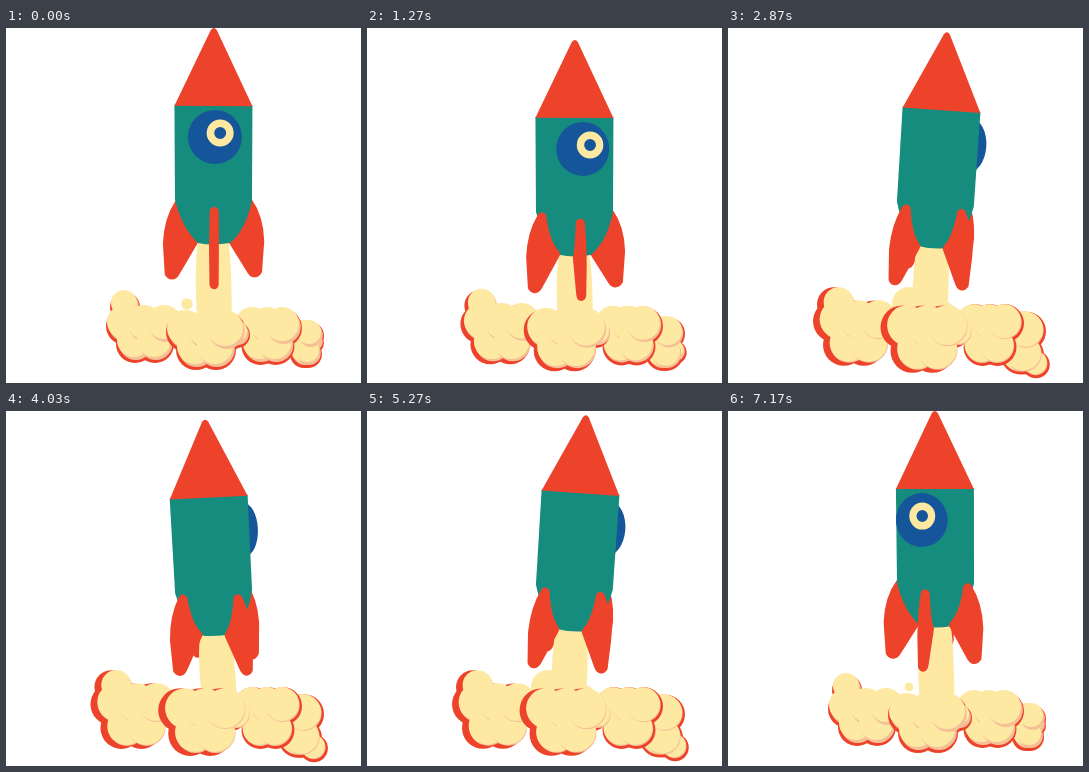
Animation of 355 by 355 pixels, one loop 7.2 s. Source, as an HTML page with a canvas:

```html
<!DOCTYPE html>
<html lang="en">
<head>
<meta charset="utf-8">
<title>Rocket</title>
<style>
html, body { margin: 0; width: 100%; height: 100%; overflow: hidden; background: #fff; }
canvas { display: block; }
</style>
</head>
<body>
<canvas width="355" height="355"></canvas>
<script>
const c = document.querySelector('canvas').getContext('2d');
const RED = '#ee432b', CREAM = '#fee9a3', PINK = '#f6c096', TEAL = '#168c7e', BLUE = '#15569a';
const CYCLE = 72;

// A cloud is a zigzag of puffs plus one nub; it drifts by move and leans its rim as it swells.
const CLOUDS = [
  { x: 138, y: 303, w: 40, r: 17, grow: 2, move: -8, lean: -5, nub: [118, 275, 13], drop: -1 },
  { x: 299, y: 313, w: 8, r: 12, grow: 6, move: -6, lean: 1, nub: [307, 311, 8], drop: 25 },
  { x: 261, y: 305, w: 30, r: 17, grow: 0, move: 0, lean: 1, nub: [270, 294, 13], drop: 0 },
  { x: 199, y: 309, w: 40, r: 18, grow: 2, move: 0, lean: -5, nub: [230, 303, 11], drop: 0 }
];

const mix = (a, b, k) => a + (b - a) * k;
const sin = deg => Math.sin(deg * Math.PI / 180);
const cos = deg => Math.cos(deg * Math.PI / 180);

function oval(x, y, rx, ry, color) {
  c.beginPath();
  c.ellipse(x, y, rx, ry, 0, 0, 7);
  c.fillStyle = color;
  c.fill();
}

const disc = (x, y, r, color) => oval(x, y, r, r, color);

function shape(d, color) {
  c.fillStyle = color;
  c.fill(new Path2D(d));
}

function fin(angle) {
  const s = sin(angle), k = .3 * cos(angle);
  const at = (r, y) => `${r * s} ${y + r * k}`;
  const d = `M${at(35, 173)}Q${at(46, 188)} ${at(47, 212)}L${at(45, 242)}` +
    `Q${at(42, 246)} ${at(39, 242)}L${at(20, 212)}Q${at(31, 200)} ${at(35, 173)}Z`;
  shape(d, RED);
  c.strokeStyle = RED;
  c.lineWidth = 9;
  c.lineJoin = 'round';
  c.stroke(new Path2D(d));
}

function porthole(angle) {
  const s = sin(angle), k = cos(angle), w = Math.abs(k);
  const x = (42 + 5 * k) * s, y = 109 + 1.5 * (1 - k);
  oval(x, y, Math.max(27 * w, 6), 27, BLUE);
  if (k < .1) return;
  const eye = x + (4.7 + 15 * s) * k;
  oval(eye, y - 4, 13.5 * w, 13.5, CREAM);
  oval(eye, y - 4, 6 * w, 6, BLUE);
}

function exhaust(step, top, lean) {
  const x = 207 - 48 * lean, y = top + 210, end = 209 - 130 * lean;
  shape(`M${x - 14} ${y}Q${x - 20} ${y + 28} ${end - 16} 310H${end + 17}Q${x + 20} ${y + 28} ${x + 15} ${y}Z`, CREAM);
  const puff = Math.max(0, 17 * cos((step - 14) * 5));
  disc(181, 276, puff, CREAM);
  disc(212, 292, puff * 1.15, CREAM);
}

function rocket(step) {
  const spin = step < 14 ? 2 + step * 9 : 128 + (step - 14) * 10.1;
  const top = 6 + 6 * cos((step - 36) * 5);
  const tilt = .6 + 3.8 * sin((step - 1) * 5);
  const fins = [0, 85, 178, 283].map(a => a + spin).sort((a, b) => cos(a) - cos(b));
  const isFront = a => cos(a) > .35;
  const posed = paint => {
    c.save();
    c.translate(207, top + 170);
    c.rotate(tilt * Math.PI / 180);
    c.translate(0, -170);
    paint();
    c.restore();
  };
  const facing = cos(spin) > 0;

  posed(() => fins.filter(a => !isFront(a)).forEach(fin));
  exhaust(step, top, sin(tilt));
  posed(() => {
    if (!facing) porthole(spin);
    shape('M-39 77H39L39 172Q33 202 17 215Q0 218 -15 215Q-31 200 -38 172Z', TEAL);
    shape('M-39 78L-3 2Q0 -2 3 2L39 78Z', RED);
    if (facing) porthole(spin);
    fins.filter(isFront).forEach(fin);
  });
}

function cloud({ x, y, w, r, grow, move, lean, nub, drop }, swell) {
  const shift = move * swell, size = grow * swell;
  const puffs = [[nub[0] + (drop > 0 ? 0 : shift), nub[1] + drop * swell, nub[2] + size / 2 + swell]];
  for (let i = 0; i < 5; i++) {
    const rise = (9 + 3 * swell) * (i % 2 ? 1 : -1);
    puffs.push([x + shift + w * (i / 4 - .5), y + rise, r + size]);
  }
  const dx = mix(1, lean, swell), dy = mix(4, 2, swell), soft = 3 - 2 * swell;
  for (const [px, py, pr] of puffs) disc(px + dx, py + dy, pr + 2, RED);
  for (const [px, py, pr] of puffs) {
    disc(px + soft * .6, py + soft, pr, PINK);
    disc(px, py, pr, CREAM);
  }
}

function draw(ms) {
  const step = Math.floor((ms % 7200 + 4) * .03) % CYCLE;
  const swell = Math.max(0, sin(step % 36 / 22 * 180)) ** .7;
  c.clearRect(0, 0, 355, 355);
  rocket(step);
  for (const group of CLOUDS) cloud(group, swell);
}

const start = performance.now();
function tick() {
  draw(performance.now() - start);
  requestAnimationFrame(tick);
}
tick();
</script>
</body>
</html>
```
